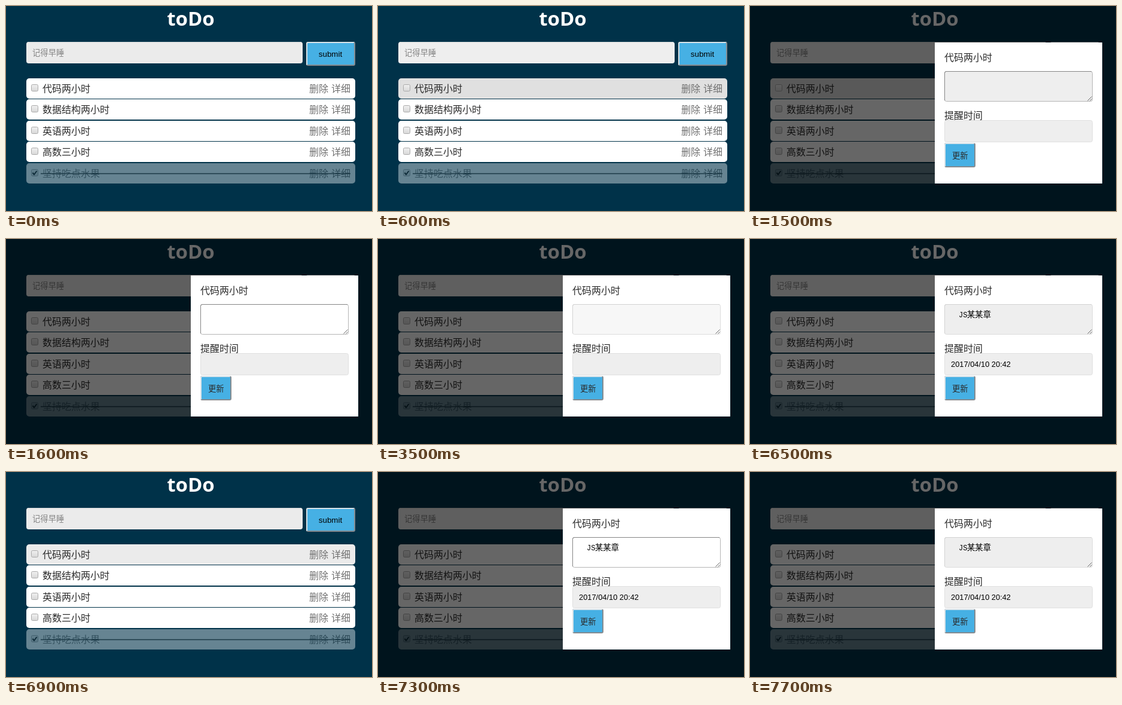
These frames come from a looping animation (612 px wide and 343 px high, 8 s). An HTML page:

```html
<!DOCTYPE html>
<html lang="zh-CN">
<head>
<meta charset="utf-8">
<title>toDo</title>
<style>
html, body { margin: 0; width: 100%; height: 100%; overflow: hidden; background: #003249; }
svg { display: block; font: 16px "Noto Sans CJK SC", "Noto Sans CJK", sans-serif; fill: #2a2a2a; }
.title { font: bold 33px "Open Sans", sans-serif; fill: #fff; }
.small { font-size: 13.33px; }
.latin { font: 13.33px "Liberation Sans", Arial, sans-serif; fill: #000; }
.date { font-size: 12.85px; }
.mono { font: 12px "Liberation Mono", monospace; }
.hint { fill: #858585; }
.link { fill: #707070; }
.done { opacity: .4; }
.done .label { fill: #808080; }
</style>
</head>
<body>
<svg width="612" height="343" viewBox="0 0 612 343">
  <defs>
    <linearGradient id="box" x2="0" y2="1">
      <stop stop-color="#f0f0f0"/><stop offset="1" stop-color="#d8d8d8"/>
    </linearGradient>
  </defs>
  <rect width="612" height="343" fill="#003249"/>
  <text class="title" x="309" y="33" text-anchor="middle">toDo</text>
  <rect id="entry" x="34" y="60" width="462" height="36" rx="4"/>
  <path d="M36 60.5H494" stroke="#d9d9d9"/>
  <text class="small hint" x="44" y="83">记得早睡</text>
  <g id="submit"></g>
  <text class="latin" x="542.5" y="85" text-anchor="middle">submit</text>
  <g id="list"></g>
  <g id="modal">
    <rect width="612" height="343" fill="#000" opacity=".6"/>
    <rect x="309" y="61" width="280" height="236" fill="#fff"/>
    <text x="325" y="92">代码两小时</text>
    <rect id="note" x="325.5" y="109.5" width="247" height="50" rx="3"/>
    <path id="edge" d="M325.5 158V112q0-2.5 2.5-2.5H571" fill="none"/>
    <path d="M564.5 158.5l7-7M568.5 158.5l3-3" stroke="#666"/>
    <text x="325" y="189">提醒时间</text>
    <rect x="325.5" y="191.5" width="247" height="36" rx="3" fill="#eee" stroke="#e0e0e0"/>
    <g id="filled">
      <text class="small" x="349" y="131" style="fill:#000"><tspan class="mono">JS</tspan><tspan x="363">某某章</tspan></text>
      <text class="latin date" x="336" y="214">2017/04/10 20:42</text>
    </g>
    <g id="update"></g>
    <text class="small" x="338" y="255">更新</text>
  </g>
</svg>
<script>
const $ = id => document.getElementById(id);

const button = (x, y, w, h) => `
  <rect x="${x}" y="${y}" width="${w}" height="${h}" rx="3" fill="#858b90"/>
  <path d="M${x} ${y + h - 1}V${y + 3}q0-3 3-3H${x + w - 1}l-2 2L${x + 2} ${y + h - 2}z" fill="#d9e3e9"/>
  <rect x="${x + 2}" y="${y + 2}" width="${w - 4}" height="${h - 4}" rx="1" fill="#46b0e4"/>`;

const row = (label, i) => {
  const y = [121, 156, 192, 227, 263][i], done = i === 4;
  const tick = '<path d="M44.5 16l2.5 3 4.5-6" fill="none" stroke="#222" stroke-width="2"/>';
  const strike = '<path d="M58 17.5H576" stroke="#444" stroke-width="1.5"/>';
  return `<g class="${done ? 'done' : ''}" transform="translate(0 ${y})">
    <rect class="back" x="34" width="550" height="34" rx="5" fill="#fff"/>
    <rect x="42.5" y="10.5" width="11" height="11" rx="2" fill="url(#box)" stroke="#aaa"/>
    <text class="label" x="61" y="23">${label}</text>
    <text class="link" x="507" y="23">删除</text>
    <text class="link" x="544" y="23">详细</text>
    ${done ? tick + strike : ''}</g>`;
};

$('submit').innerHTML = button(502, 60, 82, 40);
$('update').innerHTML = button(325, 229, 52, 41);
$('list').innerHTML = ['代码两小时', '数据结构两小时', '英语两小时', '高数三小时', '坚持吃点水果'].map(row).join('');
const first = document.querySelector('.back');

// Each track lists [start time, value]; the latest started value holds.
const tracks = {
  entry: [[0, '#ebebeb'], [400, '#eee'], [6900, '#ebebeb'], [7000, '#eee']],
  row: [[0, '#fff'], [600, '#e0e0e0'], [1600, '#fff'], [6900, '#ebebeb'], [7000, '#e0e0e0'], [7300, '#fff']],
  modal: [[0, 0], [1500, 1], [6900, 0], [7300, 1]],
  note: [[0, '#eee'], [1600, '#fff'], [3500, '#f7f7f7'], [3600, '#eee'], [3900, '#fff'],
    [4500, '#f7f7f7'], [4600, '#eee'], [6200, '#fff'], [6400, '#f7f7f7'], [6500, '#eee'],
    [7300, '#fff'], [7500, '#f9f9f9'], [7600, '#f2f2f2'], [7700, '#eee']],
  hover: [[0, 0], [1500, 1], [3500, 0], [3900, 1], [4500, 0], [6200, 1], [6400, 0], [7300, 1], [7500, 0]],
  filled: [[0, 0], [5900, 1]]
};
const at = (name, t) => tracks[name].findLast(([start]) => start <= t)[1];
const set = (el, attr, value) => el.setAttribute(attr, value);
const show = (id, t) => set($(id), 'visibility', at(id, t) ? 'inherit' : 'hidden');

function draw(now) {
  const t = now % 8000, hover = at('hover', t);
  set($('entry'), 'fill', at('entry', t));
  set(first, 'fill', at('row', t));
  set($('note'), 'fill', at('note', t));
  set($('note'), 'stroke', hover ? '#b5b5b5' : '#dcdcdc');
  set($('edge'), 'stroke', hover ? '#858585' : '#d2d2d2');
  show('modal', t);
  show('filled', t);
  requestAnimationFrame(draw);
}
draw(performance.now());
</script>
</body>
</html>
```
